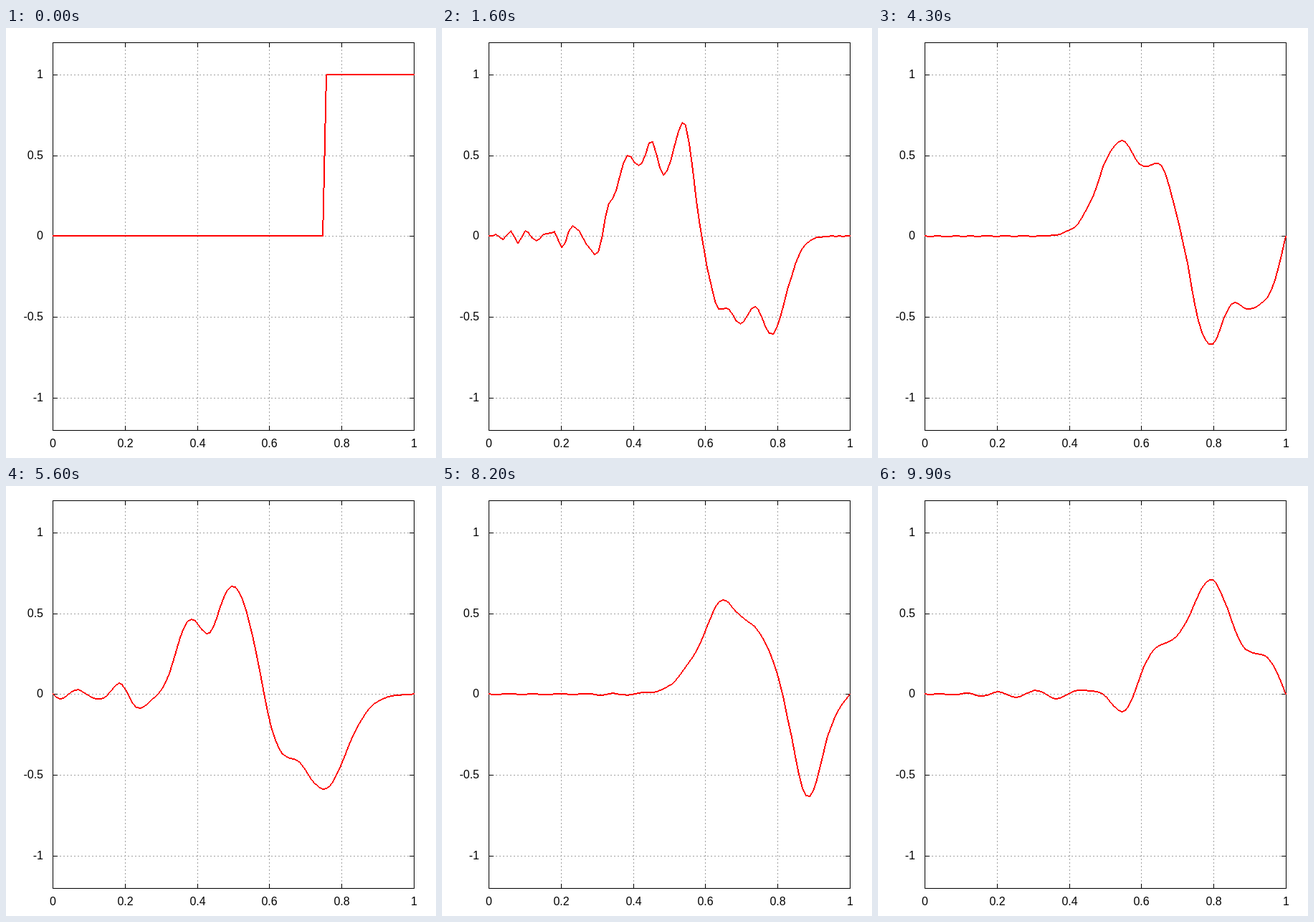
An HTML page with a canvas for the animation above (10 s loop, 600 by 600 pixels).

```html
<!DOCTYPE html>
<html lang="en">
<head>
<meta charset="utf-8">
<title>Damped wave on a string</title>
<style>
  html, body { margin: 0; width: 100%; height: 100%; overflow: hidden; background: #fff; }
  svg, canvas { position: absolute; left: 0; top: 0; width: 600px; height: 600px; display: block; }
  text { font: 16px "Liberation Sans", Arial, sans-serif; fill: #000; }
  path { fill: none; stroke-width: 1; shape-rendering: crispEdges; }
  .grid { stroke: #a0a0a0; stroke-dasharray: 2 3; }
  .axis { stroke: #000; }
</style>
</head>
<body>
<svg id="axes" viewBox="0 0 600 600"></svg>
<canvas id="curve" width="600" height="600"></canvas>
<script>
const LEFT = 65, RIGHT = 569, TOP = 20, BOTTOM = 561, TICK = 6;
const CELLS = 99, EDGE = 75;      // grid cells, first raised point
const DAMPING = 5e-5;             // decay rate per squared frequency
const FRAMES = 100, FRAME_MS = 100, FRAME_TIME = 0.1;

const toX = x => Math.floor(LEFT + x * (RIGHT - LEFT) + 0.5);
const toY = u => 599 - Math.floor(599 - BOTTOM + (u + 1.2) / 2.4 * (BOTTOM - TOP) + 0.5);

// Axes
const svg = document.getElementById("axes");

function add(tag, attrs, text = "") {
  const el = document.createElementNS("http://www.w3.org/2000/svg", tag);
  for (const key in attrs) el.setAttribute(key, attrs[key]);
  el.textContent = text;
  svg.append(el);
}
const line = (cls, d) => add("path", { class: cls, d });

function drawAxes() {
  const xs = [0, 0.2, 0.4, 0.6, 0.8, 1], ys = [-1, -0.5, 0, 0.5, 1];
  for (const v of xs) line("grid", `M${toX(v) + 0.5} ${TOP}V${BOTTOM + 1}`);
  for (const v of ys) line("grid", `M${LEFT} ${toY(v) + 0.5}H${RIGHT + 1}`);
  for (const v of xs) {
    const x = toX(v);
    line("axis", `M${x + 0.5} ${TOP}v${TICK + 1}M${x + 0.5} ${BOTTOM + 1}v${-TICK - 1}`);
    add("text", { x: x + 0.5, y: 585, "text-anchor": "middle" }, v);
  }
  for (const v of ys) {
    const y = toY(v);
    line("axis", `M${LEFT} ${y + 0.5}h${TICK + 1}M${RIGHT + 1} ${y + 0.5}h${-TICK - 1}`);
    add("text", { x: 52, y: y + 5, "text-anchor": "end" }, v);
  }
  line("axis", `M${LEFT + 0.5} ${TOP + 0.5}H${RIGHT + 0.5}V${BOTTOM + 0.5}H${LEFT + 0.5}Z`);
}

// Standing modes of the discrete string with fixed ends
const modes = [];
for (let n = 1; n < CELLS; n++) {
  let sum = 0;
  for (let j = EDGE; j < CELLS; j++) sum += Math.sin(n * Math.PI * j / CELLS);
  modes.push({
    k: n * Math.PI / CELLS,
    amp: 2 * sum / CELLS,
    w: 2 * CELLS * Math.sin(n * Math.PI / (2 * CELLS))
  });
}

function shape(time) {
  const u = new Array(CELLS + 1).fill(0);
  if (time === 0) return u.fill(1, EDGE);
  for (const { k, amp, w } of modes) {
    const a = amp * Math.exp(-DAMPING * w * w * time) * Math.cos(w * time);
    for (let j = 1; j < CELLS; j++) u[j] += a * Math.sin(k * j);
  }
  return u;
}

// Hard-edged line, two pixels thick
const ctx = document.getElementById("curve").getContext("2d");
ctx.fillStyle = "#f00";

function segment(x1, y1, x2, y2) {
  const steep = Math.abs(y2 - y1) > Math.abs(x2 - x1);
  let [a, b, aEnd, bEnd] = steep ? [y1, x1, y2, x2] : [x1, y1, x2, y2];
  if (a > aEnd) [a, b, aEnd, bEnd] = [aEnd, bEnd, a, b];
  const da = aEnd - a, db = Math.abs(bEnd - b), dir = Math.sign(bEnd - b);
  let d = 2 * db - da;
  for (; a <= aEnd; a++) {
    const y = steep ? a : b;
    if (y >= TOP && y <= BOTTOM) {
      if (steep) ctx.fillRect(b - 1, a, 2, 1);
      else ctx.fillRect(a, b - 1, 1, 2);
    }
    if (d < 0) d += 2 * db;
    else { b += dir; d += 2 * (db - da); }
  }
}

function drawCurve(frame) {
  const u = shape(frame * FRAME_TIME);
  ctx.clearRect(0, 0, 600, 600);
  for (let j = 0; j < CELLS; j++) {
    segment(toX(j / CELLS), toY(u[j]), toX((j + 1) / CELLS), toY(u[j + 1]));
  }
}

const start = performance.now();
let shown = -1;

function tick() {
  const frame = Math.floor((performance.now() - start) / FRAME_MS) % FRAMES;
  if (frame !== shown) drawCurve(shown = frame);
  requestAnimationFrame(tick);
}

drawAxes();
tick();
</script>
</body>
</html>
```
